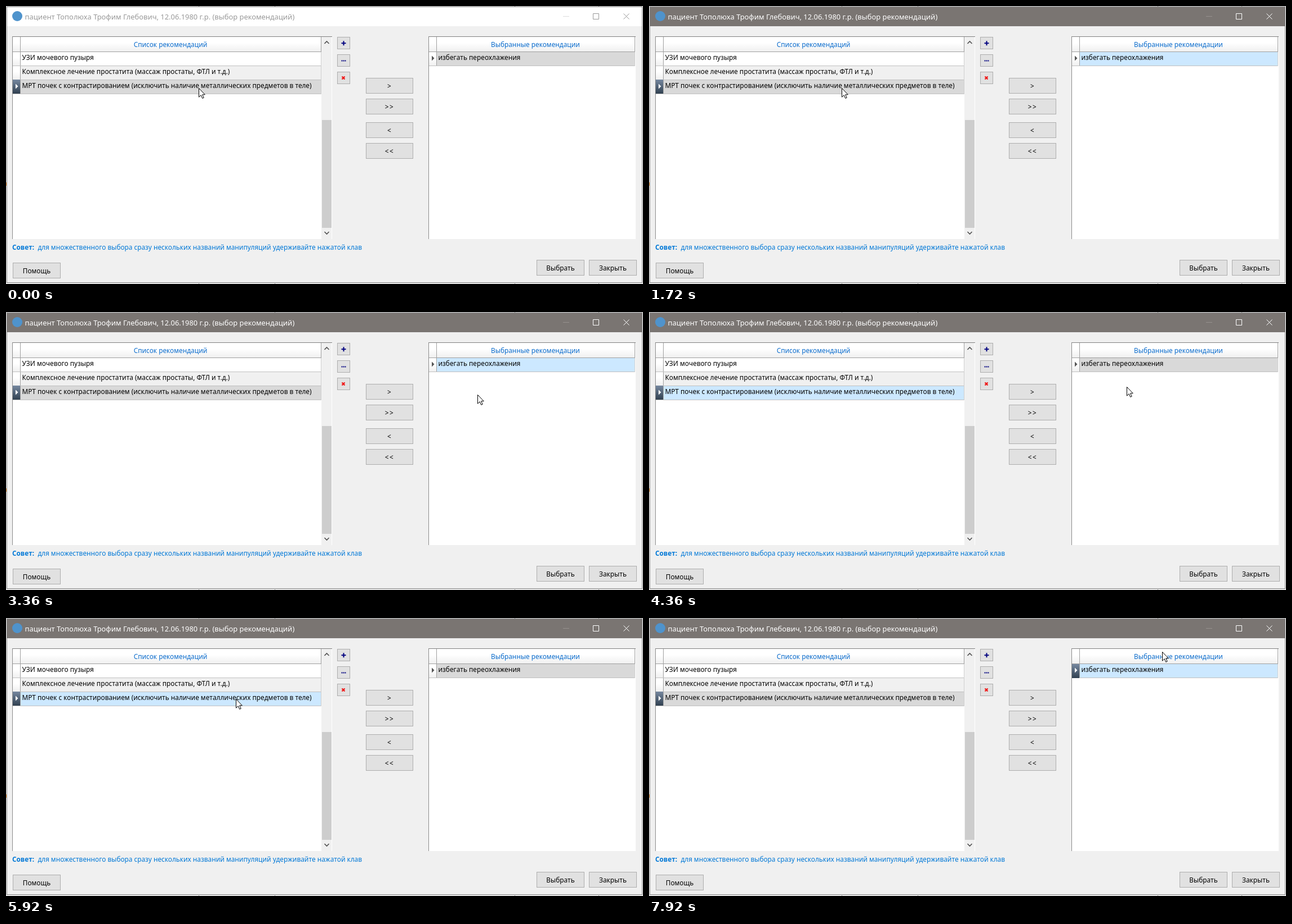
Write an HTML page that moves like this. It is 1131 px wide and 495 px high and loops after 8 s.

```html
<!DOCTYPE html>
<html lang="ru">
<head>
<meta charset="utf-8">
<style>
html, body { margin: 0; width: 100%; height: 100%; overflow: hidden; background: #e6e6e6; }
svg { display: block; width: 1131px; height: 495px; }
text { font: 11.81px "Noto Sans", "Open Sans", sans-serif; white-space: pre; }
rect { shape-rendering: crispEdges; }
</style>
</head>
<body>
<svg id="stage" viewBox="0 0 1131 495">
  <defs>
    <linearGradient id="head" x2="0" y2="1">
      <stop offset=".4" stop-color="#fff"/><stop offset="1" stop-color="#f0f0f0"/>
    </linearGradient>
    <linearGradient id="dark" x2="0" y2="1">
      <stop offset="0" stop-color="#7688a0"/><stop offset="1" stop-color="#304050"/>
    </linearGradient>
  </defs>
</svg>
<script>
const LOOP = 8000;
const GREY = '#d9d9d9', LIGHT = '#cce8ff', NAVY = '#000080';
const stage = document.getElementById('stage');

function add(tag, attrs, content, parent = stage) {
  const el = document.createElementNS('http://www.w3.org/2000/svg', tag);
  for (const key in attrs) el.setAttribute(key, attrs[key]);
  if (content) el.textContent = content;
  parent.appendChild(el);
  return el;
}

const box = (x, y, width, height, fill) => add('rect', { x, y, width, height, fill });
const path = (d, stroke, w = 1, fill = 'none') =>
  add('path', { d, stroke, fill, 'stroke-width': w });
const label = (x, y, str, fill = '#000', anchor = 'start') =>
  add('text', { x, y, fill, 'text-anchor': anchor }, str);

function frame(x, y, w, h, line, fill) {
  box(x, y, w, h, line);
  box(x + 1, y + 1, w - 2, h - 2, fill);
}

function button(x, y, w, h, str = '') {
  frame(x, y, w, h, '#adadad', '#e1e1e1');
  return label(x + w / 2, y + h / 2 + 4.5, str, '#000', 'middle');
}

// A list with header and indicator column; returns the row backgrounds
function list(x, w, gridW, split, title, rows) {
  const right = x + gridW;
  box(x, 54, w, 361, '#fff');
  box(x, 54, w, 1, '#7f7f7f');
  box(x, 54, 1, 361, '#8c8c8c');
  box(x + 1, 55, gridW, 26, 'url(#head)');
  box(x + 1, 81, gridW, 1, '#a0a0a0');
  for (const line of [split, right]) box(line, 55, 1, 27, '#a0a0a0');
  label((split + right) / 2, 73, title, '#0a6ccd', 'middle');

  return rows.map(([str, fill], i) => {
    const y = 82 + 25 * i;
    const back = box(split + 1, y, right - split - 1, 24, fill);
    box(x + 1, y, split - x - 1, 24, 'url(#head)');
    box(split, y, 1, 25, '#a0a0a0');
    box(x + 1, y + 24, gridW, 1, '#c0c0c0');
    box(right, y, 1, 25, '#d0d0d0');
    label(split + 3.5, y + 14, str);
    return back;
  });
}

const darkCell = (x, y) => box(x, y, 13, 25, 'url(#dark)');
const marker = (x, y, fill) => path(`M${x} ${y - 4.5}l4.5 4.5l-4.5 4.5z`, 'none', 0, fill);

// Slivers of the windows behind
box(0, 0, 1131, 1, '#c4c4c4');
for (const x of [342, 477, 903, 1052])
  for (const y of [0, 494]) box(x, y, 1, 1, '#666');
box(0, 314, 1, 6, '#e58a2c');

// Window and title bar
frame(1, 1, 1129, 492, '#8b8b8b', '#f0f0f0');
const bar = box(2, 2, 1127, 34, '#fff');
add('circle', { cx: 20, cy: 18, r: 9, fill: '#4f93cc' });
const caption = label(33.5, 24, 'пациент Тополюха Трофим Глебович, 12.06.1980 г.р. (выбор рекомендаций)');
caption.style.fontSize = '12.87px';
const minimize = path('M989 18.5h11', '#ccc');
const controls = path('M1042.5 13.5h10v10h-10zM1096.5 13.5l10 10m0-10l-10 10', '#999');

// Left list and its scrollbar
const leftRow = list(11, 568, 548, 25, 'Список рекомендаций', [
  ['УЗИ мочевого пузыря', '#fff'],
  ['Комплексное лечение простатита (массаж простаты, ФТЛ и т.д.)', '#f0f0f0'],
  ['МРТ почек с контрастированием (исключить наличие металлических предметов в теле)', GREY]
])[2];
darkCell(12, 131);
marker(17, 143, '#fff');
box(560, 55, 18, 360, '#f0f0f0');
box(561, 203, 17, 192, '#cdcdcd');
path('M565.5 67l4-4l4 4M565.5 402l4 4l4-4', '#505050', 1.6);

// Right list
const [rightRow] = list(750, 368, 366, 764, 'Выбранные рекомендации',
  [['избегать переохлажения', GREY]]);
const rightDark = darkCell(751, 82);
const rightMark = marker(756, 93, '#555');

// Buttons
for (let i = 0; i < 3; i++) button(588, 55 + 31 * i, 23, 22);
path('M595.5 66.2h8M599.5 62.2v8M595.5 97.5h2m1 0h2m1 0h2', NAVY, 2);
path('M596.5 125.5l5 5m0-5l-5 5', '#f01818', 2.2);
['>', '>>', '<', '<<'].forEach((str, i) => {
  const y = 128 + 37 * i + (i > 1 ? 5 : 0);
  button(639, y, 84, 28, str).style.letterSpacing = '1.5px';
});
button(12, 457, 85, 28, 'Помощь');
button(942, 452, 85, 28, 'Выбрать');
button(1035, 452, 85, 28, 'Закрыть');

label(11, 434, 'Совет:', '#0078d7').style.fontWeight = 700;
label(56.5, 434, 'для множественного выбора сразу нескольких названий манипуляций удерживайте нажатой клав', '#0078d7');

// Pointer: black outline under a white sign, tinted by the click ring
const noDrop = add('g', { transform: 'translate(348.5 153)', fill: 'none' });
for (const [stroke, w] of [['#000', 4], ['#fff', 1.7]]) {
  add('path', { d: 'M-5.5 0a5.5 5.5 0 1 0 11 0a5.5 5.5 0 1 0 -11 0M-3.9 3.9L3.9 -3.9', stroke, 'stroke-width': w }, '', noDrop);
}
const ring = add('circle', { cx: 343, cy: 147, r: 13.5, fill: '#f2f25c' });
ring.style.mixBlendMode = 'multiply';
const arrow = path('M.5 .5V16.2L4.2 12.7L6.7 18.4L9.2 17.3L6.7 11.8H11.3Z', '#000', 1, '#fff');

// Pointer moves: each starts where the one before ended, key points evenly timed
const HOME = [342, 146];
const moves = [
  { from: 2160, to: 2920, via: [[560, 225], [1015, 139], [985, 39], [930, 80], [900, 60]] },
  { from: 3000, to: 3560, via: [[921, 56], [837, 147], [848, 133]] },
  { from: 4840, to: 5640, via: [[700, 49], [400, 110], [367, 189], [487, 170]] },
  { from: 5720, to: 6280, via: [[440, 185], [386, 116], [379, 97], [398, 150]] },
  { from: 6720, to: 7360, via: [[600, 223], [964, 126], [950, 100], [935, 96]] },
  { from: 7720, to: 7920, via: [[905, 64], [911, 60]] }
];

function progress({ from, to }, t) {
  if (t >= to) return 1;
  const elapsed = Math.max(0, Math.floor((t - from - 40) / 80) * 80 + 40);
  return (elapsed + 40) / (to - from + 40);
}

function pointer(t) {
  let place = HOME;
  for (const move of moves) {
    if (t < move.from) break;
    const points = [place, ...move.via];
    const pos = progress(move, t) * move.via.length;
    const i = Math.min(Math.floor(pos), move.via.length - 1);
    place = points[i].map((a, axis) => Math.round(a + (points[i + 1][axis] - a) * (pos - i)));
  }
  return place;
}

const show = (el, on) => { el.style.display = on ? '' : 'none'; };
const paint = (el, fill) => el.setAttribute('fill', fill);

function draw(t) {
  const active = t >= 640;
  const onRight = (t >= 1720 && t < 4360) || t >= 7520;
  const picked = t >= 7560;
  const dragging = active && t < 720;

  paint(bar, active ? '#7a7572' : '#fff');
  paint(caption, active ? '#fff' : '#999');
  minimize.setAttribute('stroke', active ? '#96918e' : '#ddd');
  controls.setAttribute('stroke', active ? '#fff' : '#999');
  paint(leftRow, active && !onRight ? LIGHT : GREY);
  paint(rightRow, onRight ? LIGHT : GREY);
  show(rightDark, picked);
  paint(rightMark, picked ? '#fff' : '#555');

  show(ring, active && t < 800);
  show(noDrop, dragging);
  show(arrow, !dragging);
  arrow.setAttribute('transform', `translate(${pointer(t)})`);
}

const start = performance.now();
function tick() {
  draw((performance.now() - start) % LOOP);
  requestAnimationFrame(tick);
}
tick();
</script>
</body>
</html>
```
